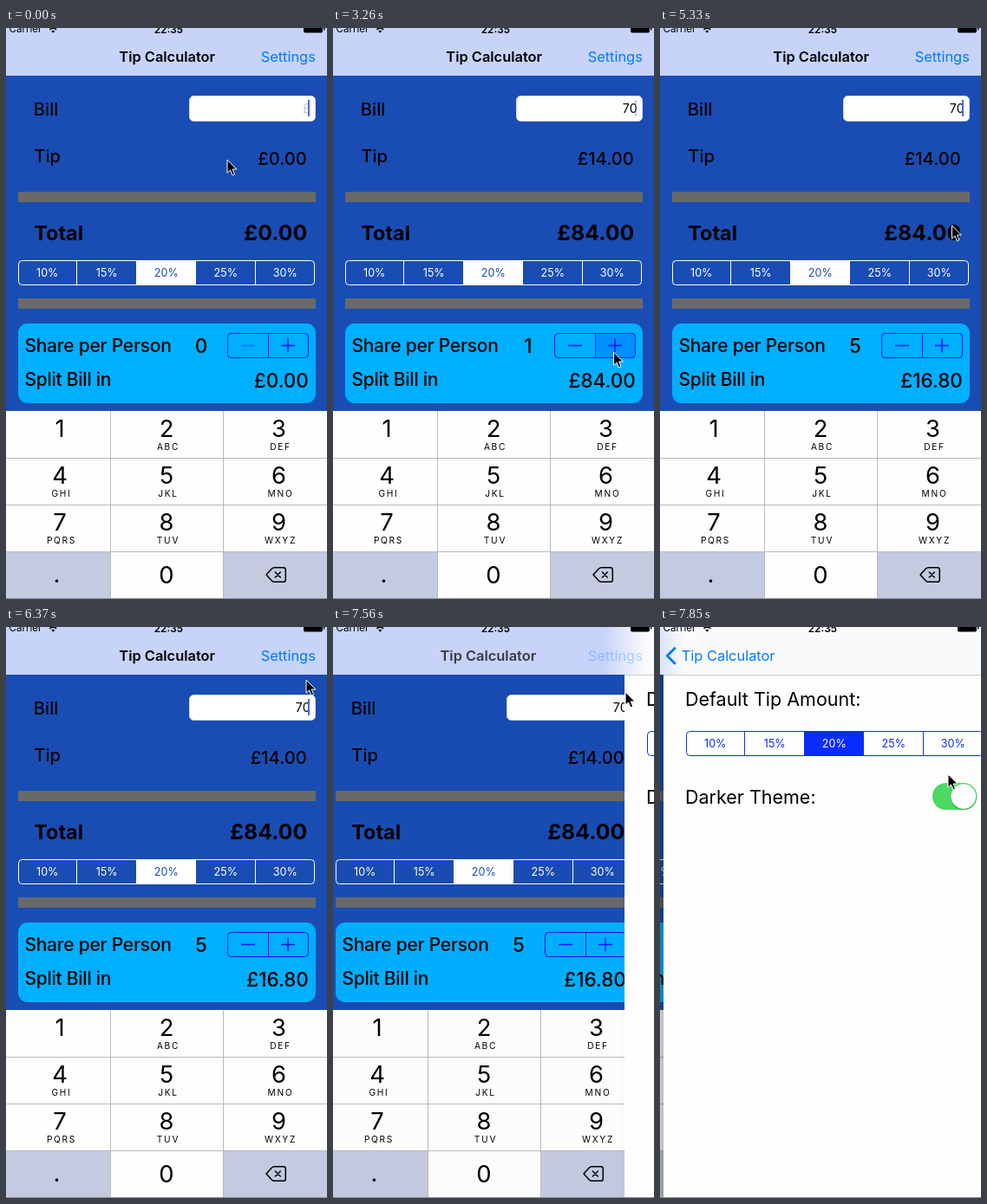
An HTML page for the animation above (8000 ms loop, 370 by 659 pixels).

```html
<!DOCTYPE html>
<html lang="en">
<head>
<meta charset="utf-8">
<title>Tip Calculator</title>
<style>
  html, body { margin: 0; width: 100%; height: 100%; overflow: hidden; background: #fff; }
  svg { display: block; width: 100%; height: 100%; font-family: Inter, Roboto, sans-serif; }
  .end { text-anchor: end; }
  .mid { text-anchor: middle; }
  .s13 { font-size: 12.6px; }
  .s20 { font-size: 20.2px; font-weight: 500; }
  .s21 { font-size: 21px; font-weight: 500; letter-spacing: -.25px; }
  .s22 { font-size: 22.5px; font-weight: 500; }
  .row { font-size: 21.5px; }
  .bar { font-size: 16.4px; }
  .bold { font-weight: 700; }
  .key { font-size: 27.4px; text-anchor: middle; }
  .abc { font-size: 10.2px; letter-spacing: 1.7px; text-anchor: middle; }
  .blue { fill: #007aff; }
</style>
</head>
<body>
<svg viewBox="0 0 370 659">
  <defs>
    <linearGradient id="barFill" gradientUnits="userSpaceOnUse" y1="0" y2="0">
      <stop offset="0" stop-color="#c7d3f8"/>
      <stop offset="1" stop-color="#fafafc"/>
    </linearGradient>
    <linearGradient id="edge">
      <stop offset="0" stop-color="#000" stop-opacity="0"/>
      <stop offset="1" stop-color="#000" stop-opacity=".2"/>
    </linearGradient>
  </defs>

  <g id="home">
    <rect width="490" height="659" fill="#194db3"/>
    <text class="s20" x="31.8" y="101">Bill</text>
    <text class="s20" x="32.3" y="155">Tip</text>
    <rect x="211.5" y="78.5" width="145" height="29" rx="5" fill="#fff" stroke="#cdd5ea"/>
    <text id="bill" class="end" x="350.6" y="98" font-size="14.2"></text>
    <rect id="caret" x="348" y="83" width="2" height="19" fill="#426bf2"/>
    <text id="tip" class="s20 end" x="346.8" y="158"></text>
    <path d="M14 189h343v12H14zM14 312h343v12H14z" fill="#696969"/>
    <text class="bold" x="32.3" y="244.5" font-size="23.4">Total</text>
    <text id="total" class="bold end" x="347.2" y="244.5" font-size="24.8"></text>
    <g id="homeTabs"></g>

    <rect x="14" y="341" width="343" height="92" rx="11" fill="#00afff"/>
    <text class="s21" x="21.4" y="374.3">Share per Person</text>
    <text class="s21" x="21.4" y="413.3">Split Bill in</text>
    <text id="count" class="s22 mid" x="225" y="374.8"></text>
    <text id="share" class="s22 end" x="348.9" y="415.3"></text>
    <path id="press" d="M302 352.5h42.5a4 4 0 0 1 4 4v20a4 4 0 0 1-4 4H302z" fill="#0018ff" fill-opacity=".2"/>
    <g fill="none" stroke="#0012fa">
      <rect x="255.5" y="352.5" width="93" height="28" rx="4"/>
      <path d="M302.5 352.5v28"/>
      <path id="minus" d="M271 366.5h16" stroke-width="1.5"/>
      <path d="M317 366.5h16M325 358.5v16" stroke-width="1.5"/>
    </g>

    <rect y="442" width="370" height="217" fill="#fefefe"/>
    <path d="M0 604h120v55H0zM250 604h120v55H250z" fill="#c4cbe0"/>
    <path d="M0 496.5h370M0 550.5h370M0 604.5h370M120.5 442v217M250.5 442v217" stroke="#b9babd" fill="none"/>
    <g id="keys"></g>
    <g fill="none" stroke="#000" stroke-width="1.5" stroke-linejoin="round" stroke-linecap="round">
      <path d="M300 631l6.4-7q1.2-1.3 3-1.3h10.3q2.6 0 2.6 2.6v11.4q0 2.6-2.6 2.6h-10.3q-1.8 0-3-1.3z"/>
      <path d="M310.3 628l6 6m0-6l-6 6"/>
    </g>
  </g>
  <rect id="dim" y="55" width="370" height="604"/>

  <g id="page">
    <rect id="shadow" x="-8" y="55" width="8" height="604" fill="url(#edge)"/>
    <rect y="55" width="370" height="604" fill="#fefefe"/>
    <path d="M0 55.5h370" stroke="#c8c8cb"/>
    <text class="row" x="24.9" y="91">Default Tip Amount:</text>
    <g id="pageTabs"></g>
    <text class="row" x="24.9" y="203.5">Darker Theme:</text>
    <rect x="310" y="180" width="51.5" height="31" rx="15.5" fill="#4cd964"/>
    <circle cx="345.8" cy="197" r="14.6" fill="#000" fill-opacity=".15"/>
    <circle cx="345.8" cy="195.5" r="14.3" fill="#fff"/>
  </g>

  <rect width="370" height="55" fill="url(#barFill)"/>
  <text x="3.5" y="5.3" font-size="11.6">Carrier</text>
  <text class="mid" x="187.3" y="5.5" font-size="11.8" font-weight="600">22:35</text>
  <path d="M54.3 5.8l-2-2.3q2-1.6 4 0z"/>
  <path d="M50.4 1.8q3.9-3.2 7.8 0" fill="none" stroke="#000" stroke-width="1.5"/>
  <path d="M343 0h22v3.8q0 1.8-1.8 1.8h-18.4q-1.8 0-1.8-1.8zM366 0h1.4v2.4H366z"/>
  <text id="title" class="bar mid" y="39" font-weight="600">Tip Calculator</text>
  <text id="settings" class="bar end blue" x="356.8" y="39">Settings</text>
  <g id="back">
    <path d="M17.8 23.8L8.3 33.3l9.5 9.5" fill="none" stroke="#007aff" stroke-width="2.8"/>
    <text id="backText" class="bar mid blue" y="39">Tip Calculator</text>
  </g>
  <rect y="658" width="370" height="1" fill="#8d8d92"/>

  <path id="pointer" d="M0 0v15.2l3.5-3.2 2.5 5.8 2.6-1.1-2.5-5.7h4.8z" fill="#000" stroke="#fff" stroke-width="1"/>
</svg>
<script>
const LOOP = 8000, TICK = LOOP / 54;
const $ = id => document.getElementById(id);
const clamp = v => Math.max(0, Math.min(1, v));
const pounds = v => "£" + v.toFixed(2);
const set = (id, name, value) => $(id).setAttribute(name, value);
const slide = (id, x, y = 0) => set(id, "transform", `translate(${x.toFixed(2)} ${y.toFixed(2)})`);

// Segmented control with the third part selected; dividers snap to whole pixels.
function tabs(id, x, y, w, line, picked) {
  const part = 68.5, first = x - 1.3;
  const cut = i => Math.floor(first + i * part) + 0.5;
  let out = `<rect x="${cut(2) - 0.5}" y="${y}" width="${cut(3) - cut(2) + 1}" height="28" fill="${line}"/>
    <rect x="${x}" y="${y}" width="${w}" height="28" rx="4" fill="none" stroke="${line}"/>`;
  [10, 15, 20, 25, 30].forEach((n, i) => {
    if (i) out += `<path d="M${cut(i)} ${y}v28" stroke="${line}"/>`;
    out += `<text class="s13 mid" x="${first + (i + 0.5) * part + 0.3}" y="${y + 18.7}" fill="${i === 2 ? picked : line}">${n}%</text>`;
  });
  $(id).innerHTML = out;
}

function keypad() {
  const cols = [62, 185, 314.5];
  const letters = ["", "ABC", "DEF", "GHI", "JKL", "MNO", "PQRS", "TUV", "WXYZ"];
  $("keys").innerHTML = letters.map((abc, i) => {
    const x = cols[i % 3], y = 472 + 54 * Math.floor(i / 3);
    return `<text class="key" x="${x}" y="${y}">${i + 1}</text>
      <text class="abc" x="${x + 2}" y="${y + 15}">${abc}</text>`;
  }).join("") + `<text class="key" x="185" y="641">0</text><text class="key" x="58.5" y="640">.</text>`;
}

// Pointer stops: time, x, y.
const path = [
  [0, 255, 152], [1630, 255, 152], [2074, 288, 249], [2519, 320, 396], [2667, 324, 381],
  [2815, 323.5, 374], [5050, 323.5, 374], [5630, 350, 75], [6075, 346, 61],
  [7400, 346, 61], [7556, 337, 75], [7852, 332, 170]
];
function pointerAt(t) {
  const i = path.findIndex(p => p[0] > t);
  if (i < 0) return path[path.length - 1].slice(1);
  const [a, b] = [path[i - 1], path[i]];
  const k = (t - a[0]) / (b[0] - a[0]);
  return [a[1] + (b[1] - a[1]) * k, a[2] + (b[2] - a[2]) * k];
}

function caretAt(t) {
  if (t < 700) return 1 - clamp((t - 230) / 190);
  if (t < 1400) return 1;
  const phase = (t - 3235 + 4000) % 1000;
  return phase < 300 ? clamp(phase / 65) : 1 - clamp((phase - 430) / 190);
}

// Taps on plus: start and release.
const taps = [[2960, 3405], [3405, 3700], [3850, 3998], [4590, 4738], [5035, 5180]];

// Critically damped push.
function pushAt(t) {
  const k = Math.max(0, t - 7530.7) * 0.0204;
  return 1 - Math.exp(-k) * (1 + k);
}

function draw(time) {
  const t = Math.floor((time + 8) / TICK) % 54 * TICK;

  const bill = t < 735 ? 0 : t < 1328 ? 7 : 70;
  $("bill").textContent = bill || "£";
  set("bill", "fill", bill ? "#000" : "#c7c7cd");
  $("tip").textContent = pounds(bill * 0.2);
  $("total").textContent = pounds(bill * 1.2);
  set("caret", "opacity", caretAt(t));

  const count = taps.filter(([down]) => t >= down).length;
  $("count").textContent = count;
  $("share").textContent = pounds(count ? bill * 1.2 / count : 0);
  set("minus", "opacity", count ? 1 : 0.4);
  set("press", "opacity", taps.some(([down, up]) => t >= down && t < up) ? 1 : 0);

  const p = pushAt(t), edge = Math.round(370 * (1 - p));
  slide("home", Math.round(-117 * p));
  slide("page", edge);
  set("page", "visibility", p ? "visible" : "hidden");
  set("shadow", "opacity", p);
  set("dim", "opacity", 0.1 * p);
  set("barFill", "x1", p ? edge - 24 : 380);
  set("barFill", "x2", p ? edge + 24 : 428);

  set("title", "x", 185.7 - 74 * p);
  set("backText", "x", 185.5 - 108 * p);
  set("title", "opacity", clamp(1 - 3 * p));
  set("back", "opacity", clamp((p - 0.3) / 0.65));
  set("settings", "opacity", t < 7250 ? 1 : 0.32 * clamp(1 - p * 1.2));

  slide("pointer", ...pointerAt(t));
}

tabs("homeTabs", 14.5, 268.5, 341, "#fff", "#194db3");
tabs("pageTabs", 26.5, 120.5, 342, "#0a2cff", "#fff");
keypad();

const start = performance.now();
function frame() {
  draw((performance.now() - start) % LOOP);
  requestAnimationFrame(frame);
}
frame();
</script>
</body>
</html>
```
